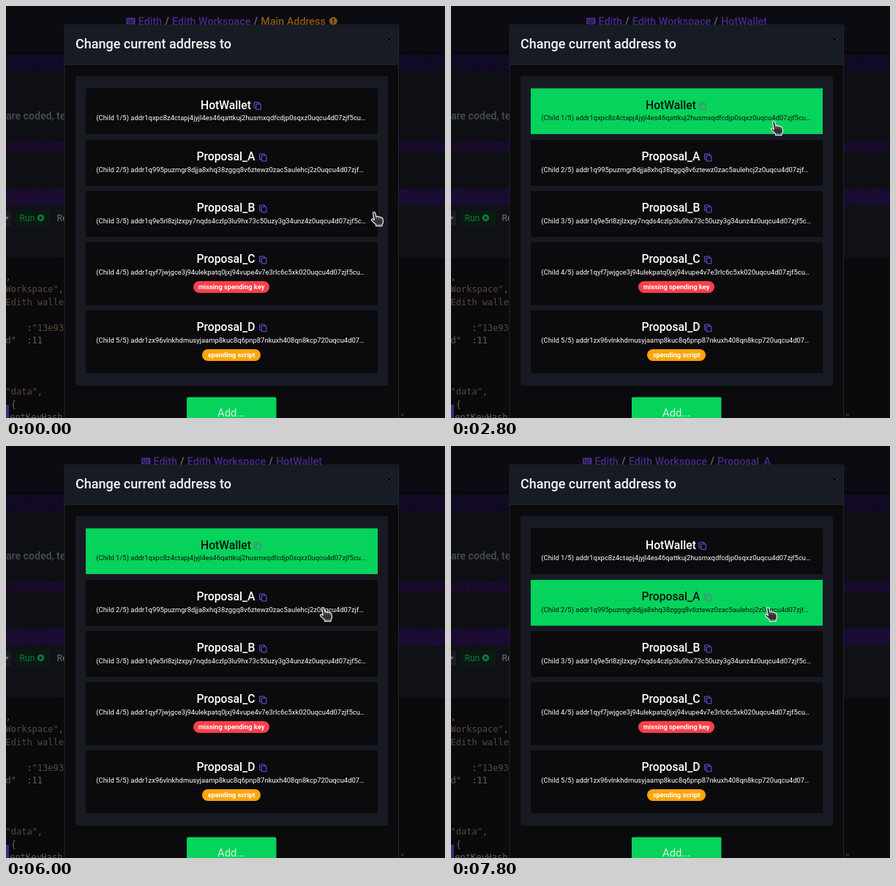
These frames come from a looping animation (600x563 px, 8000 ms). An HTML page with a canvas:

```html
<!DOCTYPE html>
<html lang="en">
<head>
<meta charset="utf-8">
<title>Change current address</title>
<style>
html, body { margin: 0; width: 100%; height: 100%; overflow: hidden; background: #0b0b0e; }
canvas { display: block; }
</style>
</head>
<body>
<canvas id="stage" width="600" height="563"></canvas>
<script>
const ctx = document.getElementById('stage').getContext('2d');
const LOOP = 8000, STEP = 200;
const SANS = 'Roboto, sans-serif';
const MONO = '"DejaVu Sans Mono", monospace';
const GREEN = '#05d35c', DARK = '#0b0a0d', PURPLE = '#482a88', AMBER = '#8a5a12';
const USER = 'Edith';

const cards = [
  { name: 'HotWallet', y: 112.5, h: 62.5, addr: 'addr1qxpc8z4ctapj4jyjl4es46qattkuj2husmxqdfcdjp0sqxz0uqcu4d07zjf5cu…' },
  { name: 'Proposal_A', y: 183, h: 62.5, addr: 'addr1q995puzmgr8djja8xhq38zggq8v6ztewz0zac5aulehcj2z0uqcu4d07zjf…' },
  { name: 'Proposal_B', y: 253, h: 62.5, addr: 'addr1q9e5rl8zjlzxpy7nqds4czlp3lu9hx73c50uzy3g34unz4z0uqcu4d07zjf5c…' },
  { name: 'Proposal_C', y: 323, h: 85.5, addr: 'addr1qyf7jwjgce3j94ulekpatq0jxj94vupe4v7e3rlc6c5xk020uqcu4d07zjf5cu…',
    badge: 'missing spending key', color: '#ff3f49', w: 104 },
  { name: 'Proposal_D', y: 416, h: 85.5, addr: 'addr1zx96vlnkhdmusyjaamp8kuc8q6pnp87nkuxh408qn8kcp720uqcu4d07…',
    badge: 'spending script', color: '#ffa60c', w: 80 }
];

// time, x, y of the fingertip
const path = [
  [0, 503, 281], [1200, 456, 204], [1800, 441, 180], [2200, 441, 157],
  [4600, 441, 157], [5200, 428, 183], [6000, 433, 220], [8000, 433, 220]
];

function rect(x, y, w, h, color, r = 0) {
  ctx.fillStyle = color;
  ctx.beginPath();
  ctx.roundRect(x, y, w, h, r);
  ctx.fill();
}

function disc(x, y, r, color) {
  ctx.fillStyle = color;
  ctx.beginPath();
  ctx.arc(x, y, r, 0, Math.PI * 2);
  ctx.fill();
}

function text(str, x, y, size, color, weight = 400, align = 'left', family = SANS) {
  ctx.font = `${weight} ${size}px ${family}`;
  ctx.textAlign = align;
  ctx.fillStyle = color;
  ctx.fillText(str, x, y);
}

function noise(a, b, c) {
  const v = Math.sin(a * 12.9898 + b * 78.233 + c * 37.719) * 43758.5453;
  return v - Math.floor(v);
}

// Dark violet band that shimmers slightly at both sides of the dialog
function band(y, h, base, seed, tick) {
  rect(0, y, 600, h, base);
  for (let x = 0; x < 600; x += 4) {
    if (x > 80 && x < 532) continue;
    for (let row = 0; row < h; row += 4) {
      const n = noise(x, row + seed, Math.floor(tick / 3));
      const tint = x < 40 && seed > 1 ? '80,20,50' : '60,25,110';
      rect(x, y + row, 4, Math.min(4, h - row), `rgba(${tint},${n * 0.12})`);
    }
  }
}

function code(str, row, color, col = 0) {
  text(str, col * 7.22 - 0.5, 373.5 + row * 17.5, 12, color, 400, 'left', MONO);
}

function backdrop(tick) {
  rect(0, 0, 600, 563, '#0d0f15');
  rect(0, 0, 600, 62, '#0b0c11');
  rect(0, 62, 600, 4, '#08080c');
  band(66, 23, '#0f0920', 1, tick);
  band(185, 14, '#150a26', 2, tick);
  band(250, 22, '#180b30', 3, tick);
  text('are coded, te', 0, 155, 14.1, '#494c54', 500);

  rect(0, 272, 600, 72, '#0f1117');
  rect(-4, 280, 11, 20, '#1b1d23', 3);
  ctx.fillStyle = '#6b6e75';
  ctx.beginPath();
  ctx.moveTo(-2, 288);
  ctx.lineTo(4, 288);
  ctx.lineTo(1, 292);
  ctx.fill();
  rect(12, 279, 49, 21, '#0a1a13', 3);
  text('Run', 18.5, 294, 12.2, '#0b7a39');
  disc(47.5, 289.5, 4.7, '#0b7a39');
  ctx.fillStyle = '#0a1a13';
  ctx.beginPath();
  ctx.moveTo(46, 287);
  ctx.lineTo(50, 289.5);
  ctx.lineTo(46, 292);
  ctx.fill();
  text('Re', 69.5, 294, 12.2, '#72757c');

  rect(0, 344, 600, 219, '#0a090b');
  const grey = '#5d5f65', brown = '#594a38';
  code(',', 0, grey);
  code('Workspace"', 1, brown);
  code(',', 1, grey, 10);
  code(USER + ' walle', 2, brown);
  code(':', 4, grey, 4);
  code('"13e93', 4, brown, 5);
  code('d"  :11', 5, grey);
  code('"data"', 9, brown);
  code(',', 9, grey, 6);
  code('{', 10, grey, 1);
  code('entKeyHash', 11, grey, 0.8);
  rect(0, 545, 4, 18, '#43277c');
  code('"', 11, brown, 74.6);
}

function breadcrumb(selected) {
  const last = selected < 0 ? 'Main Address' : cards[selected].name;
  const parts = [USER, USER + ' Workspace', last];
  const size = 14.3, gap = 14, icon = 16.5;
  ctx.font = `500 ${size}px ${SANS}`;
  const widths = parts.map(p => ctx.measureText(p).width);
  const total = icon + widths.reduce((a, b) => a + b) + gap * 2 + (selected < 0 ? 16 : 0);
  let x = 308.5 - total / 2;

  rect(x, 16, 12.5, 9, PURPLE, 1.5);
  for (let i = 0; i < 3; i++) {
    rect(x + 2 + i * 3.2, 18, 1.6, 1.3, '#0b0c12');
    rect(x + 2 + i * 3.2, 20.2, 1.6, 1.3, '#0b0c12');
  }
  rect(x + 3, 22.5, 6.5, 1, '#0b0c12');
  x += icon;
  parts.forEach((part, i) => {
    text(part, x, 25.5, size, selected < 0 && i === 2 ? AMBER : PURPLE, 500);
    x += widths[i];
    if (i < 2) text('/', x + gap / 2, 25.5, size, '#6b6c72', 500, 'center');
    x += gap;
  });
  if (selected < 0) {
    x += 10.5 - gap;
    disc(x, 20.5, 5.5, AMBER);
    rect(x - 0.8, 17.3, 1.6, 4, '#0b0c12');
    rect(x - 0.8, 22.2, 1.6, 1.6, '#0b0c12');
  }
}

function copyIcon(x, y, color, back) {
  ctx.strokeStyle = color;
  ctx.lineWidth = 1.3;
  ctx.beginPath();
  ctx.roundRect(x + 0.6, y + 0.6, 7, 7.5, 1);
  ctx.stroke();
  rect(x + 3.2, y + 2.8, 7, 8, back, 1);
  ctx.beginPath();
  ctx.roundRect(x + 3.2, y + 2.8, 6.6, 7.6, 1);
  ctx.stroke();
}

function card(c, active) {
  const back = active ? GREEN : DARK, ink = active ? '#08130c' : '#fff';
  rect(109, c.y, 399, c.h, back);
  text(c.name, 300.5, c.y + 28.3, 15.7, ink, 500, 'center');
  copyIcon(c.name === 'HotWallet' ? 338.5 : 346, c.y + 18.5, active ? '#4b8d78' : '#6443bd', back);
  const index = cards.indexOf(c) + 1;
  text(`(Child ${index}/5) ${c.addr}`, 123.3, c.y + 43.5, 9.45, ink);
  if (c.badge) {
    rect(308 - c.w / 2, c.y + 53, c.w, 16, c.color, 8);
    text(c.badge, 308, c.y + 64, 9.3, '#fff', 700, 'center');
  }
}

function closeMark() {
  for (const [color, width] of [['#444a55', 3], ['#07080b', 1.9]]) {
    ctx.strokeStyle = color;
    ctx.lineWidth = width;
    ctx.beginPath();
    ctx.moveTo(519, 41);
    ctx.lineTo(528.5, 49.5);
    ctx.moveTo(528.5, 41);
    ctx.lineTo(519, 49.5);
    ctx.stroke();
  }
}

function dialog(selected) {
  rect(79.5, 25.5, 457.5, 545, '#23262d', 2);
  rect(80.5, 26, 455.5, 545, DARK, 2);
  rect(80.5, 26, 455.5, 54, '#171b23', 2);
  rect(80.5, 79.5, 455.5, 1, '#292d35');
  text('Change current address to', 95, 58, 18, '#f6f6f7', 500);
  closeMark();
  rect(95, 95.5, 427, 423.5, '#171a23', 3);
  cards.forEach((c, i) => card(c, i === selected));
  rect(247, 534.5, 122.5, 40, GREEN, 2);
  text('Add...', 308, 561, 14.8, '#d5f8e2', 400, 'center');
}

function pointer(t) {
  const i = path.findIndex((p, k) => k < path.length - 1 && t < path[k + 1][0]);
  const [t0, x0, y0] = path[i], [t1, x1, y1] = path[i + 1];
  const k = (t - t0) / (t1 - t0);
  ctx.save();
  ctx.translate(x0 + (x1 - x0) * k - 4, y0 + (y1 - y0) * k);
  ctx.lineJoin = 'round';
  const hand = new Path2D('M2.5 2C2.5 .2 5.5 .2 5.8 2L7 7Q9 5.8 10 7.3Q12 6.3 13 8Q15.5 7.6 16 10L16.5 14Q16.5 16 15 17.5V19.5H6.5V17.5L1 12.5Q-.2 10.5 1.5 10Q3 10 4.4 11.5Z');
  ctx.fillStyle = '#323234';
  ctx.fill(hand);
  ctx.strokeStyle = '#e2e2e4';
  ctx.lineWidth = 1.3;
  ctx.stroke(hand);
  ctx.strokeStyle = '#8b8b8e';
  ctx.lineWidth = 0.8;
  ctx.stroke(new Path2D('M7 7.5L7.6 10.5M10 7.7L10.6 10.5M13 8.5L13.5 11M6.5 17.5H15'));
  ctx.restore();
}

function draw(now) {
  const tick = Math.floor((now % LOOP) / STEP);
  const t = tick * STEP;
  const selected = t < 2800 ? -1 : t < 7000 ? 0 : 1;
  backdrop(tick);
  breadcrumb(selected);
  dialog(selected);
  pointer(t);
}

const start = performance.now();
function loop() {
  draw(performance.now() - start);
  requestAnimationFrame(loop);
}
loop();
</script>
</body>
</html>
```
